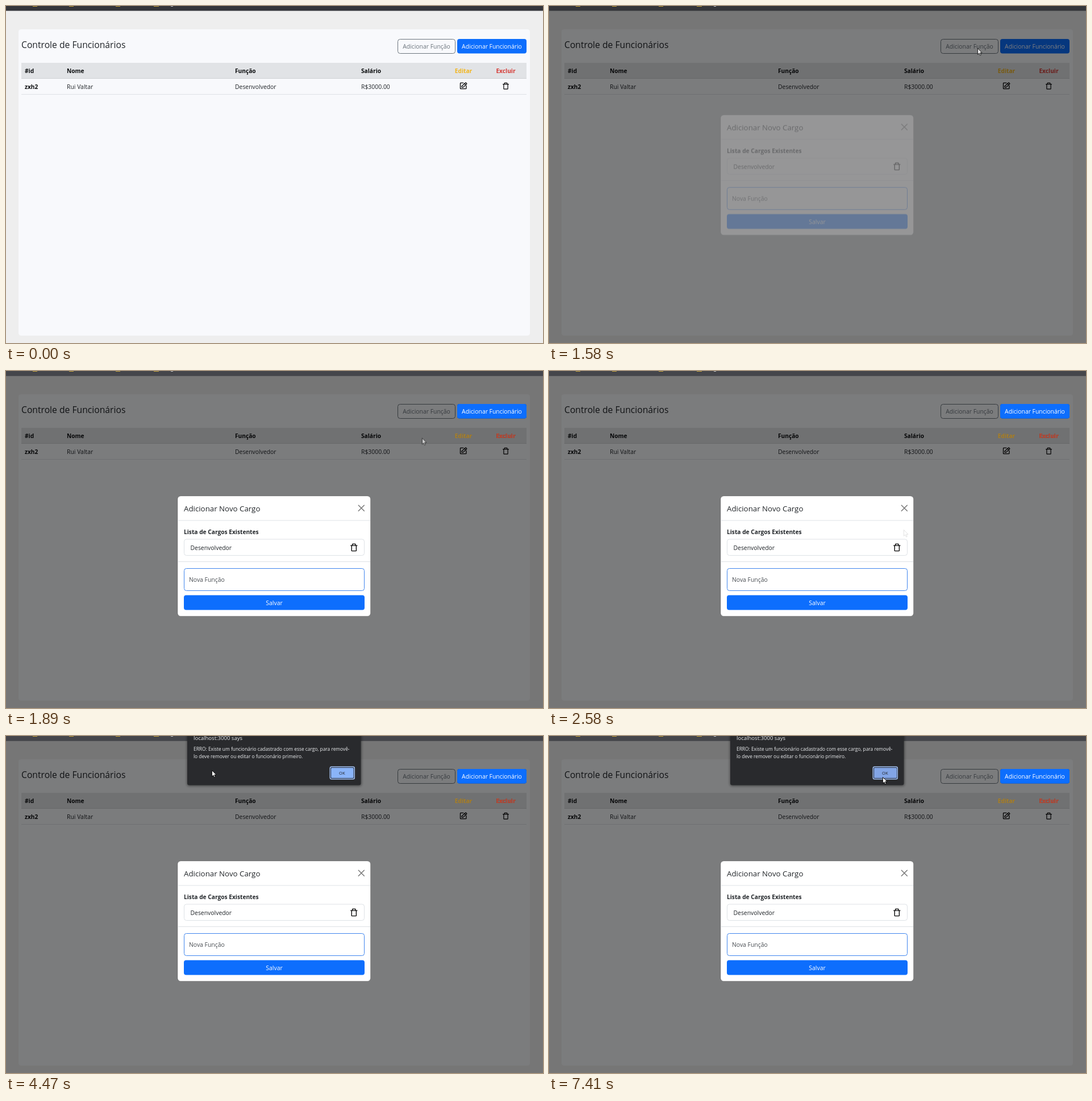
An HTML page that plays this animation: 945 by 593 pixels, repeating every 8 s.

```html
<!DOCTYPE html>
<html lang="pt-BR">
<head>
<meta charset="utf-8">
<title>Controle de Funcionários</title>
<style>
html, body { margin: 0; width: 100%; height: 100%; overflow: hidden; background: #eee; }
svg { display: block; width: 945px; height: 593px; }
text { font: 10.4px "Open Sans", "Noto Sans", sans-serif; fill: #212529; white-space: pre; }
.b { font-weight: 700; font-size: 10.2px; fill: #0b0d0f; }
.h { font-weight: 500; font-size: 15.7px; }
.h2 { font-weight: 500; font-size: 13.3px; }
.mid { text-anchor: middle; }
.white { fill: #fff; }
.dlg { font-size: 8.37px; fill: #eceef0; }
.line { fill: none; stroke: #dee2e6; }
.edit { fill: #f2b61f; }
.del { fill: #d63a35; }

/* every track shares one 8 s clock */
.cursor, .arrow, .hand, .hover, .hoverText, .shade, .late, .modal, .slide, .alert, .okHover {
  animation: 8s linear infinite;
}
.cursor { animation-name: move; }
.arrow { animation-name: arrow; }
.hand { animation-name: hand; }
.hover { animation-name: hover; }
.hoverText { animation-name: hoverText; }
.shade { animation-name: shade; }
.late { animation-name: late; }
.modal { animation-name: modal; }
.slide { animation-name: slide; }
.alert { animation-name: alert; }
.okHover { animation-name: okHover; }

@keyframes move {
  0%, 2.75% { transform: translate(875px, 600px); animation-timing-function: cubic-bezier(.25, .2, .35, 1); }
  11.5% { transform: translate(757px, 76px); }
  12.75%, 17.5% { transform: translate(755px, 72px); }
  19.75% { transform: translate(754px, 74px); }
  21.375% { transform: translate(752px, 79px); }
  22.875% { transform: translate(743px, 101px); animation-timing-function: cubic-bezier(.3, .3, .5, 1); }
  32.25% { transform: translate(624px, 279px); }
  33% { transform: translate(622px, 286px); animation-timing-function: ease-out; }
  37.5%, 49.5% { transform: translate(612px, 311px); animation-timing-function: cubic-bezier(.35, 0, .35, 1); }
  55.875%, 58.875% { transform: translate(362px, 60px); animation-timing-function: ease-in-out; }
  68.875% { transform: translate(479px, 57px); animation-timing-function: cubic-bezier(.3, .2, .4, 1); }
  76%, 92.25% { transform: translate(587px, 68px); }
  92.625%, 100% { transform: translate(587px, 72px); }
}
@keyframes arrow {
  0%, 17.5%, 34.5%, 49.5%, 100% { animation-timing-function: step-end; }
  0% { opacity: 1; }
  10.25% { opacity: 0; animation-timing-function: step-end; }
  17.5% { opacity: 1; }
  34.5% { opacity: 0; }
  49.5%, 100% { opacity: 1; }
}
@keyframes hand {
  0% { opacity: 0; animation-timing-function: step-end; }
  10.25% { opacity: 1; animation-timing-function: step-end; }
  17.5% { opacity: 0; animation-timing-function: step-end; }
  34.5% { opacity: 1; animation-timing-function: step-end; }
  49.5%, 100% { opacity: 0; }
}
@keyframes hover {
  0%, 10.25% { fill-opacity: 0; }
  12.125%, 17.5% { fill-opacity: 1; }
  19.375%, 100% { fill-opacity: 0; }
}
@keyframes hoverText {
  0%, 10.25% { fill: #6c757d; }
  12.125%, 17.5% { fill: #fff; }
  19.375%, 100% { fill: #6c757d; }
}
@keyframes shade {
  0%, 17.5% { opacity: 0; }
  19.375%, 100% { opacity: .5; }
}
@keyframes late {
  0% { opacity: 0; animation-timing-function: step-end; }
  20.5%, 100% { opacity: 1; }
}
@keyframes modal {
  0%, 19.375% { opacity: 0; }
  21.25%, 100% { opacity: 1; }
}
@keyframes slide {
  0%, 19.375% { transform: translateY(-34px); animation-timing-function: ease-out; }
  23.125%, 100% { transform: none; }
}
@keyframes alert {
  0%, 42% { opacity: 0; }
  44.5%, 100% { opacity: 1; }
}
@keyframes okHover {
  0%, 73.5% { opacity: 0; }
  74.75%, 100% { opacity: 1; }
}
</style>
</head>
<body>
<svg viewBox="0 0 945 593">
  <defs>
    <g id="trash" fill="none" stroke="#000" stroke-width="2">
      <path d="M-9-5H9M-6-5V8Q-6 9 -5 9H5Q6 9 6 8V-5M-4-5V-8Q-4-9 -3-9H3Q4-9 4-8V-5"/>
    </g>
    <g id="pencil" fill="none" stroke="#000" stroke-width="2">
      <path d="M1-8H-7Q-8-8 -8-7V7Q-8 8 -7 8H7Q8 8 8 7V-1M-4 4V1L5.5-8.2Q6.5-9 7.5-8.2L9-6.7Q9.8-5.8 9-4.9L-.5 4ZM3.500-6 7-2.500"/>
    </g>
    <g id="add">
      <rect x="794" y="58" width="122" height="25.500" rx="4" fill="#0d6efd"/>
      <text x="855" y="75" class="mid white">Adicionar Funcionário</text>
    </g>
    <filter id="blur" x="-10%" y="-20%" width="120%" height="150%"><feGaussianBlur stdDeviation="2"/></filter>
  </defs>

  <rect width="945" height="593" fill="#eee"/>
  <rect x="22" y="41" width="900" height="539" rx="4.500" fill="#f8f9fc"/>
  <text x="27" y="74" class="h">Controle de Funcionários</text>

  <rect x="689.500" y="58.500" width="101" height="25" rx="4" fill="#6c757d" stroke="#6c757d" class="hover"/>
  <text x="740" y="75" class="mid hoverText">Adicionar Função</text>
  <use href="#add"/>

  <rect x="27" y="100" width="889" height="27.500" fill="#e1e3e6"/>
  <path class="line" d="M27 127.500H916" style="stroke:#cfd2d5"/>
  <path class="line" d="M27 155.500H916"/>
  <g class="head">
    <text x="33" y="118" class="b">#id</text>
    <text x="107" y="118" class="b">Nome</text>
    <text x="403" y="118" class="b">Função</text>
    <text x="625" y="118" class="b">Salário</text>
    <text x="805" y="118" class="b mid edit">Editar</text>
    <text x="879.500" y="118" class="b mid del">Excluir</text>
  </g>
  <text x="33" y="146" class="b">zxh2</text>
  <text x="107" y="146">Rui Valtar</text>
  <text x="403" y="146">Desenvolvedor</text>
  <text x="625" y="146">R$3000.00</text>
  <use href="#pencil" transform="translate(804.700 140.500) scale(.65)"/>
  <use href="#trash" transform="translate(879.500 140.700) scale(.6)"/>

  <rect class="shade" width="945" height="593"/>
  <g class="late">
    <use href="#add"/>
    <text x="805" y="118" class="b mid" style="fill:#a98230">Editar</text>
    <text x="879.500" y="118" class="b mid" style="fill:#c4482f">Excluir</text>
  </g>

  <rect width="945" height="8.500" fill="#35363a"/>
  <rect width="945" height="8.500" fill="#45464b" class="late"/>
  <path d="M47 .4h8M111 .4h8M193 .4h8M260 .4h9" stroke="#d9b13c"/>
  <path d="M290 .4h4" stroke="#d5d6d8"/>

  <g class="modal">
    <g class="slide">
      <rect x="302" y="220" width="339.500" height="211.500" rx="5.500" fill="#fff" stroke="#000" stroke-opacity=".2"/>
      <text x="313" y="247" class="h2">Adicionar Novo Cargo</text>
      <path d="M620.300 236.300l10 10m0-10l-10 10" stroke="#777" stroke-width="1.500" stroke-linecap="round"/>
      <path class="line" d="M302.500 263H641M302.500 335.500H641"/>
      <text x="313" y="286.500" class="b" style="fill:#212529">Lista de Cargos Existentes</text>
      <rect class="line" x="313.500" y="296" width="317" height="28.500" rx="4"/>
      <text x="324.500" y="314.500">Desenvolvedor</text>
      <use href="#trash" transform="translate(612.300 310.500) scale(.68)"/>
      <rect x="313.500" y="347.500" width="317" height="39" rx="4" fill="#fff" stroke="#3f85ee"/>
      <text x="322" y="371" style="fill:#484d52">Nova Função</text>
      <rect x="313" y="394.500" width="318" height="26" rx="4" fill="#0d6efd"/>
      <text x="472" y="411.700" class="mid white">Salvar</text>
    </g>
  </g>

  <g class="alert">
    <rect x="318.500" y="-10" width="307" height="98" rx="4" opacity=".45" filter="url(#blur)"/>
    <rect x="319" y="-10" width="305.500" height="96.500" rx="3.500" fill="#292a2d"/>
    <text x="330" y="7" class="dlg" style="font-size:9.550px">localhost:3000 says</text>
    <text x="330" y="26" class="dlg">ERRO: Existe um funcionário cadastrado com esse cargo, para removê-</text>
    <text x="330" y="39.200" class="dlg">lo deve remover ou editar o funcionário primeiro.</text>
    <rect x="570.300" y="54.300" width="43" height="21.400" rx="2.500" fill="#202736" stroke="#a8c6f8" stroke-width="1.400"/>
    <rect x="572" y="56" width="39.600" height="18" rx="1.500" fill="#8ab4f8"/>
    <rect x="572" y="56" width="39.600" height="18" rx="1.500" fill="#82a5e6" class="okHover"/>
    <text x="591.300" y="67.500" class="mid" style="font-size:7.600px;fill:#202124">OK</text>
  </g>

  <g class="cursor" fill="#fff" stroke="#000" stroke-width=".9" stroke-linejoin="round">
    <path class="arrow" d="M.4 .5V11.300L2.900 9 4.500 12.800 6.300 12 4.700 8.300H8Z"/>
    <path class="hand" d="M-1 1Q0-.5 1 1V5Q2.200 4.300 3 5.400 4.200 4.700 5 5.900 6.500 5.500 6.500 7V10Q6.500 12 5.300 14H-1.500Q-2.500 11.500-4.500 9 -5-.2-4.500 7.500-3 6.500-1 9Z"/>
  </g>
</svg>
</body>
</html>
```
